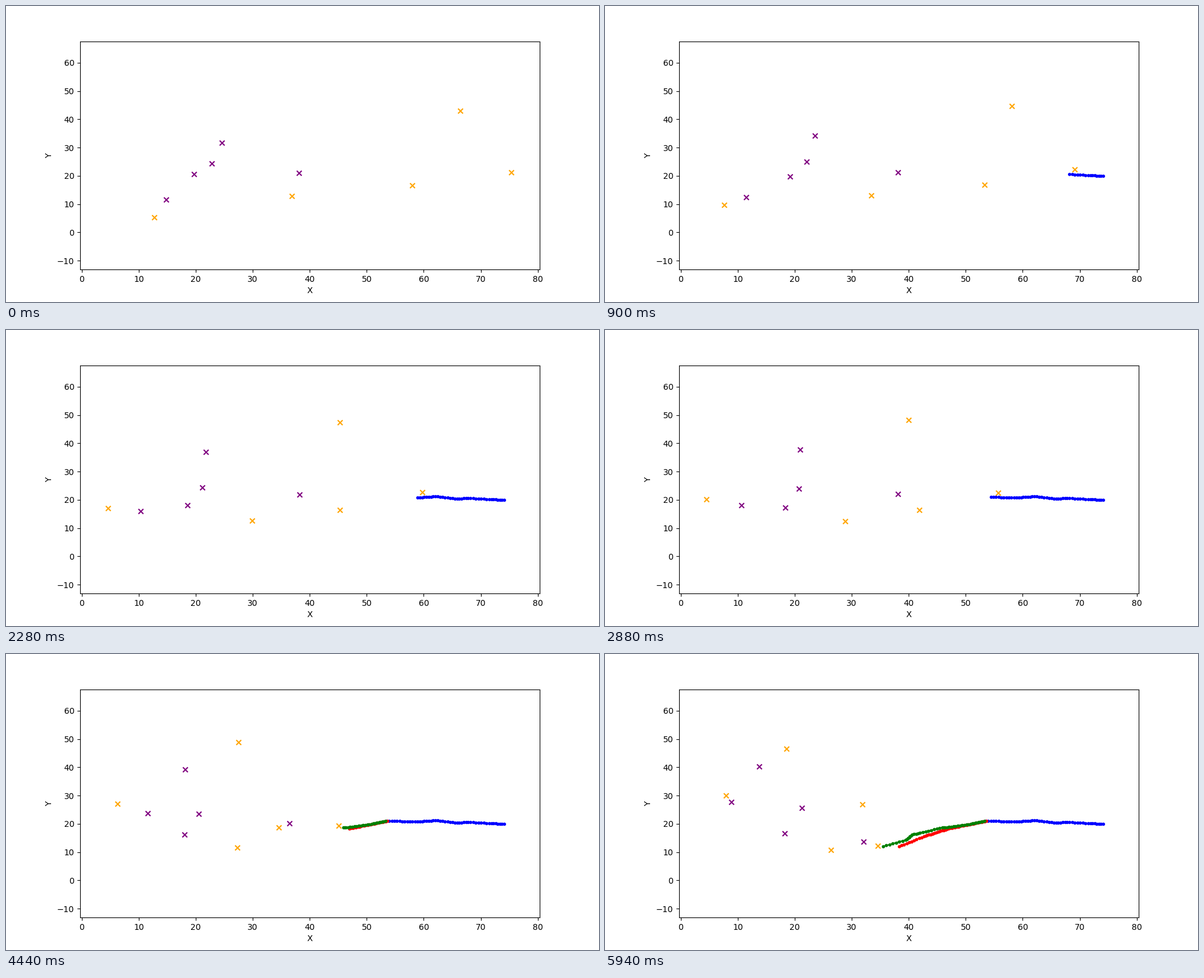
A matplotlib script for the animation above (6000 ms loop, 1000 px wide and 500 px high).

```python
import numpy as np
import matplotlib.pyplot as plt
from matplotlib.animation import FuncAnimation

FRAMES = 100
SPLIT = 50                      # observed steps before the two futures branch
XLIM, YLIM = (-0.297, 80.349), (-13.1, 67.5)
KEYS = (0, 29, 60, 99)


def to_data(px, py):
    """Stage pixels, counted from the top left, to axis units."""
    x = XLIM[0] + (px - 125) / 775 * (XLIM[1] - XLIM[0])
    y = YLIM[0] + (445 - py) / 385 * (YLIM[1] - YLIM[0])
    return np.column_stack([x, y])


def agent(*waypoints):
    """Glide along the cubic through four waypoints."""
    t = np.arange(FRAMES)
    return to_data(*(np.polyval(np.polyfit(KEYS, axis, 3), t)
                     for axis in zip(*waypoints)))


def trail(*points):
    """One dot per step between a few (step, x, y) points."""
    steps, xs, ys = zip(*points)
    t = np.arange(steps[0], steps[-1] + 1)
    return to_data(np.interp(t, steps, xs), np.interp(t, steps, ys))


orange = np.stack([
    agent((250, 357), (178, 315), (177, 269), (204, 239)),
    agent((482, 321), (426, 321), (397, 325), (381, 331)),
    agent((685, 303), (593, 303), (494, 302), (434, 254)),
    agent((766, 177), (611, 161), (454, 149), (306, 160)),
    agent((852, 281), (737, 274), (616, 280), (460, 324)),
])
purple = np.stack([
    agent((270, 327), (227, 314), (236, 283), (213, 250)),
    agent((317, 284), (308, 293), (302, 303), (303, 303)),
    agent((347, 266), (334, 264), (325, 270), (332, 260)),
    agent((364, 231), (344, 210), (318, 198), (260, 190)),
    agent((494, 282), (495, 279), (489, 279), (436, 317)),
])

past = trail((0, 840, 287), (7, 815, 286), (14, 783, 284), (21, 757, 285),
             (28, 728, 281), (37, 694, 283), (49, 642, 282))
actual = trail((50, 640, 282), (59, 617, 287), (71, 573, 293), (73, 569, 293),
               (81, 531, 302), (85, 518, 305), (91, 507, 314), (98, 469, 325))
predicted = trail((50, 643, 282), (73, 579, 295), (88, 538, 308),
                  (98, 496, 325))

fig, ax = plt.subplots(figsize=(10, 5), dpi=100)
ax.set(xlim=XLIM, ylim=YLIM, xlabel="X", ylabel="Y")
orange_marks = ax.scatter([], [], marker="x", color="orange")
purple_marks = ax.scatter([], [], marker="x", color="purple")
past_line, = ax.plot([], [], ".-", color="blue")
predicted_line, = ax.plot([], [], ".-", color="red")
actual_line, = ax.plot([], [], ".-", color="green")


def update(frame):
    orange_marks.set_offsets(orange[:, frame])
    purple_marks.set_offsets(purple[:, frame])
    ahead = max(frame - SPLIT, 0)
    past_line.set_data(*past[:frame].T)
    predicted_line.set_data(*predicted[:ahead].T)
    actual_line.set_data(*actual[:ahead].T)
    return orange_marks, purple_marks, past_line, predicted_line, actual_line


anim = FuncAnimation(fig, update, frames=FRAMES, interval=60, repeat=True)
plt.show()
```
